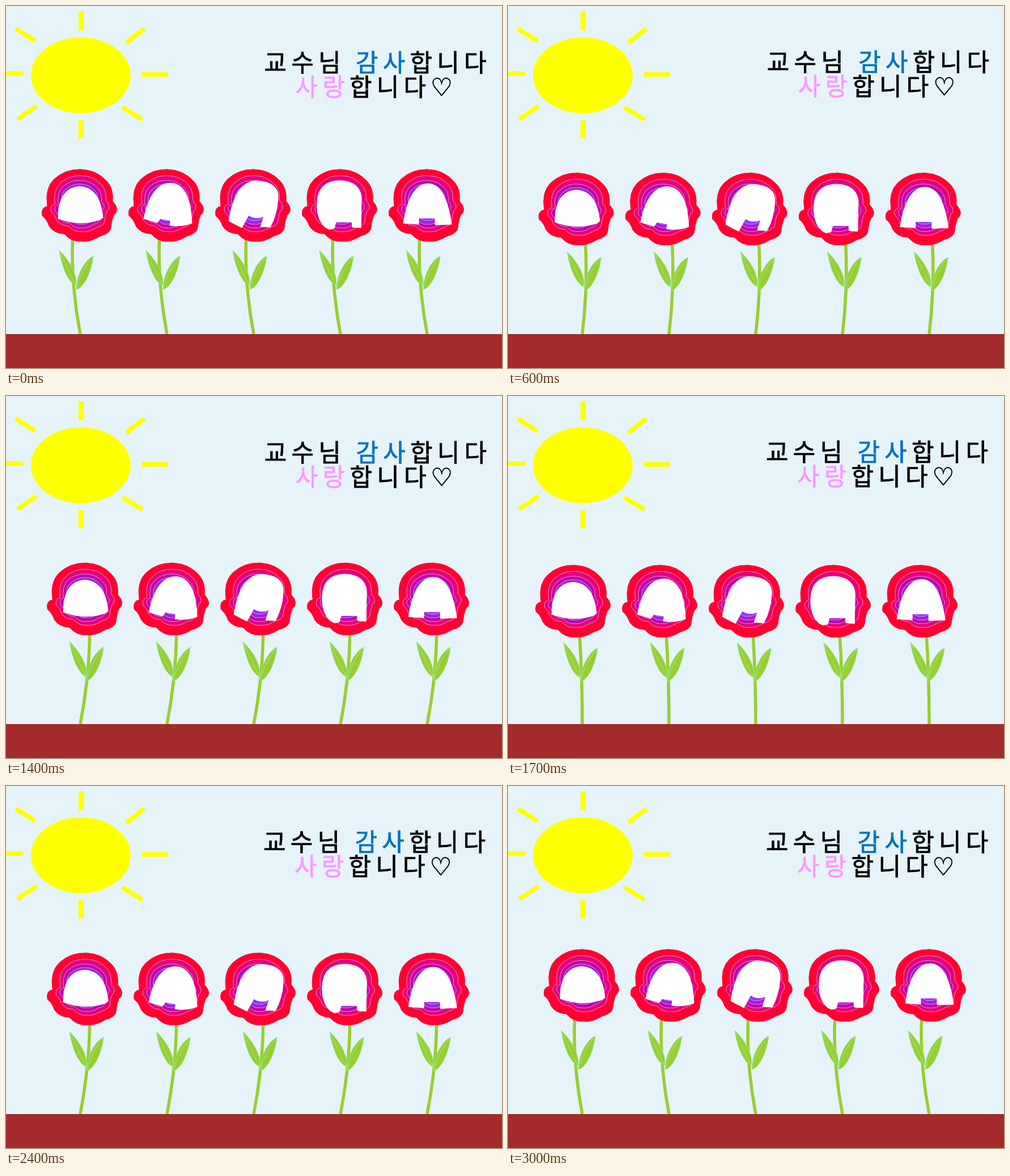
Animation, 875 px wide and 640 px high, one loop 3100 ms. Source, as an HTML page without scripts:

```html
<!DOCTYPE html>
<html lang="ko">
<head>
<meta charset="utf-8">
<title>Flowers</title>
<style>
@property --tick { syntax: "<integer>"; inherits: true; initial-value: 0; }
@keyframes ticks { to { --tick: 31; } }

html, body { margin: 0; width: 100%; height: 100%; overflow: hidden; background: #e6f4fa; }

/* One tick is 100 ms and one sway takes ten ticks; every pose is a wave of the tick. */
svg {
  display: block; width: 100vw; height: 100vh;
  animation: ticks 3.1s steps(31) -1ms infinite;
  --turn: calc(var(--tick) * 36deg);
  --head-x: calc(15.6 * sin(var(--turn)));
  --head-y: calc(.685 * max(var(--head-x), -1 * var(--head-x)));
  --bow: calc(-29.4 * cos(var(--turn) + 18deg));
}
.head { transform: translate(calc(var(--head-x) * 1px), calc(var(--head-y) * 1px)); }
.leaves {
  fill: #9acd32; stroke: #90ee90;
  transform: translate(calc(7.9px + 10.3px * cos(var(--turn) - 140deg)), calc(var(--head-y) * .35px));
}
/* Bows a unit curve sideways and shears its tip along with the head. */
.stem {
  fill: none; stroke: #9acd32; stroke-width: 5.5; vector-effect: non-scaling-stroke;
  transform: matrix(calc(var(--bow) - var(--head-x) / 2), 0, calc(var(--head-x) / -292), calc(1 - var(--head-y) / 292), 0, 0);
}
.ring { stroke-width: .9; vector-effect: non-scaling-stroke; }
.words {
  font: 500 43px "Noto Sans CJK KR", "Noto Sans CJK", sans-serif;
  letter-spacing: 8.2px; word-spacing: -2px; stroke: #000; stroke-width: .8;
  transform: translate(calc(.4px + 1.5px * sin(var(--tick) * 11.6deg)), calc(-.5px - .7px * sin(var(--tick) * 65deg)));
}
.heart { font: 44px "DejaVu Sans", sans-serif; text-anchor: middle; letter-spacing: 0; }
.blue { fill: #0070c0; stroke: #0070c0; }
.pink { fill: #ff99ff; stroke: #ff99ff; }
.rays { stroke: #ff0; stroke-width: 8; }
.blanks { fill: #fff; stroke: #fff; stroke-linejoin: round; }
</style>
</head>
<body>
<svg viewBox="0 0 875 640">
  <defs>
    <path id="ring" class="ring" d="M1 -63Q30 -63 49 -41Q60 -28 58 -7Q72 8 60 18Q56 28 55 40Q54 50 36 55Q18 66 4 64Q-14 66 -27 51Q-46 50 -54 37Q-58 25 -66 19Q-69 4 -57 2Q-62 -30 -45 -46Q-25 -64 1 -63Z"/>
    <g id="flower">
      <g transform="translate(131 580)"><path class="stem" d="M0 0Q1 -146 0 -292"/></g>
      <g class="leaves">
        <path d="M94 432C97 455 108 488 123 494C127 475 112 450 94 432Q107 462 123 494"/>
        <path d="M154 442C140 448 124 475 124 501C135 500 150 475 154 442Q132 468 124 501"/>
      </g>
      <g class="head">
        <g transform="translate(130 352)" stroke="#dfa6e0">
          <use href="#ring" fill="#f03" stroke="#f03"/>
          <use href="#ring" fill="#e6007a" transform="translate(1 -3) scale(.78)"/>
          <use href="#ring" fill="#bf00b0" transform="translate(0 -2) scale(.66)"/>
          <use href="#ring" fill="#a020e0" transform="translate(0 -2) scale(.56)"/>
          <use href="#ring" fill="#93f" transform="translate(0 -2) scale(.46)"/>
        </g>
      </g>
    </g>
  </defs>

  <rect width="875" height="640" fill="#e6f4fa"/>
  <ellipse cx="132" cy="122.5" rx="88" ry="67" fill="#ff0"/>
  <g class="rays">
    <path stroke-width="9.5" d="M132.800 9V43M132.500 202V234"/>
    <path d="M0 119.500H30M240 121H286M17 40L52 62M244 40L212 65M20 200L54 177M205 179L241 201"/>
  </g>

  <g class="words">
    <text x="455" y="116">교수님 <tspan class="blue">감사</tspan>합니다</text>
    <text x="510" y="159"><tspan class="pink">사랑</tspan>합니다</text>
    <text class="heart" x="768" y="159">♡</text>
  </g>

  <use href="#flower"/>
  <use href="#flower" x="153"/>
  <use href="#flower" x="306"/>
  <use href="#flower" x="459"/>
  <use href="#flower" x="612"/>

  <g class="head blanks">
    <path d="M92 376Q92 321 130 319Q166 321 171 374L166 378Q130 390 92 376Z"/>
    <path d="M243 376Q256 313 290 313Q325 313 328 384Q310 391 289 388L290 379 272 376 267 383Z"/>
    <path d="M393 380Q404 309 442 309Q482 311 480 340Q478 370 466 391L449 390 455 372Q440 378 428 370L416 392Z"/>
    <path d="M549 360Q545 309 588 309Q628 309 627 345L626 392 611 391 610 382H582L579 393 571 395Q553 390 549 360Z"/>
    <path d="M701 384Q712 314 745 314Q776 314 786 386L757 387V375H728V386Z"/>
  </g>

  <rect y="580" width="875" height="60" fill="#a52a2a"/>
</svg>
</body>
</html>
```
